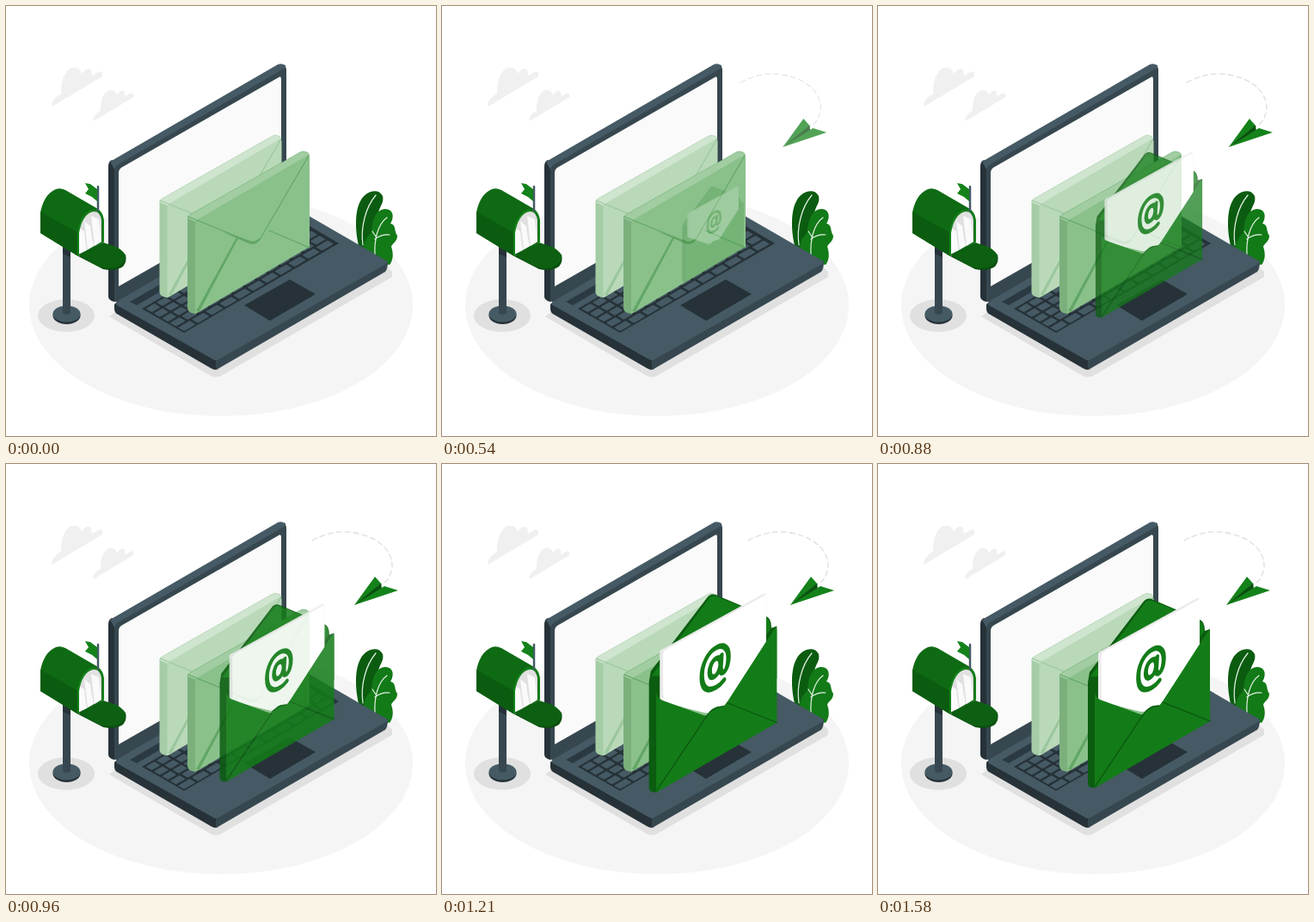
Recreate the animation shown at these times as an HTML page. Size 500 by 500 pixels, loop 1.62 s.

```html
<!DOCTYPE html>
<html lang="en">
<head>
<meta charset="utf-8">
<title>Incoming mail</title>
<style>
  html, body { margin: 0; width: 100%; height: 100%; overflow: hidden; background: #fff; }
  svg { display: block; width: 100%; height: 100%; }
  .line { fill: none; stroke-linecap: round; stroke-linejoin: round; }
</style>
</head>
<body>
<svg viewBox="0 0 500 500">
  <ellipse cx="250" cy="348" rx="223" ry="129" fill="#f5f5f5"/>

  <defs>
    <path id="cloud" d="M53 116Q53 108 64 102Q64 78 76 72Q86 70 88 79Q94 70 99 74L100 81L109 76Q113 76 112 82L57 115Q54 117 53 116Z"/>
  </defs>
  <g fill="#f0f0f0">
    <use href="#cloud"/>
    <use href="#cloud" transform="translate(58.6 40.4) scale(.8)"/>
  </g>

  <g id="plant">
    <path fill="#0b5c10" d="M411 282C406 264 405 240 412 227C418 215 433 211 438 221C440 229 434 233 433 241L427 262L424 287Z"/>
    <path fill="#127a17" d="M417 288C414 275 420 269 425 263C426 247 430 237 441 236C450 236 452 245 447 253C454 254 451 262 455 267C455 274 449 276 448 280C451 288 450 296 446 301L438 299Z"/>
    <g class="line" stroke="#e6f1e6" stroke-width="1.200">
      <path d="M415 278C412 258 418 234 430 220"/>
      <path d="M429 290C428 272 432 254 443 246M429 271Q437 265 446 266M430 268L426 262"/>
    </g>
  </g>

  <g id="laptop">
    <path fill="#e0e0e0" d="M120 361L238 430Q244 433 250 430L449 315V309L440 300L135 350Z"/>
    <path fill="#263238" d="M119 186Q119 181 123 179L131 184V341L126 344Q119 342 119 338Z"/>
    <path fill="#37474f" d="M126 184L322 70Q326 69 326 75V232L131 345L126 343Z"/>
    <path fill="#455a64" d="M121 181L316 68Q320 66 325 69Q326 71 323 73L129 185Q127 187 126 190Z"/>
    <path fill="#fafafa" d="M131 193Q131 190 134 188L317 83Q320 81 320 85V218L131 326Z"/>
    <path fill="#263238" d="M126 347L130 343L244 408V423Q241 423 238 421L129 358Q126 356 126 352Z"/>
    <path fill="#37474f" d="M244 408L444 296Q444 306 441 309L248 421Q246 423 244 423Z"/>
    <path fill="#455a64" d="M129 348Q126 346 130 343L326 229L442 296Q445 298 442 300L247 411Q244 413 241 411Z"/>
    <path fill="#2b3a42" d="M144 344L337 232L345 236L152 348Z"/>
    <path fill="#263238" d="M158 352L338 247L387 276L207 380Z"/>
    <g id="keys" fill="#455a64" transform="matrix(12.6 -7.35 9.4 5.5 160 352)"/>
    <path fill="#263238" d="M277 348L330 318L360 335L307 366Z"/>
  </g>

  <g id="mailbox">
    <ellipse cx="70" cy="360" rx="33" ry="19" fill="#e0e0e0"/>
    <ellipse cx="70.500" cy="360" rx="16" ry="10" fill="#263238"/>
    <ellipse cx="70.500" cy="358" rx="16" ry="9.500" fill="#455a64"/>
    <path fill="#37474f" d="M66 275H75V357Q70 361 66 357Z"/>
    <path fill="#263238" d="M66 278L75 283V292L66 288Z"/>
    <path fill="#0f6a14" d="M40 264V240Q44 219 58 213Q63 211 69 214L107 236Q113 240 113 249V275L84 291Z"/>
    <path fill="#0b5c10" d="M40 264V239L84 264V291Z"/>
    <path fill="#e0e0e0" d="M84 290V264Q87 245 98 240Q109 236 111 249V274Z"/>
    <path fill="#fafafa" d="M85 258L91 262Q92 274 94 284L85 289ZM91 250L98 256Q99 268 102 279L95 283ZM99 244L108 248L111 274L103 279Z"/>
    <path class="line" stroke="#14821a" stroke-width="2" d="M84 289V264Q87 244 99 238Q111 235 113 249V274"/>
    <path fill="#0b4f0f" d="M84 291L113 277L139 289Q141 297 136 303Q127 309 113 306Z"/>
    <path fill="#0d6012" d="M84 289L113 275L128 280Q140 286 139 294Q135 304 121 305Q113 305 106 302Z"/>
    <path class="line" stroke="#455a64" stroke-width="2.500" d="M107 210V238"/>
    <path fill="#14821a" d="M92 206L98 207L106 213V227L100 222L92 218L96 213Z"/>
  </g>

  <defs>
    <g id="closed">
      <path fill="var(--side)" d="M211 247L221 248V358Q211 357 211 351Z"/>
      <path fill="var(--top)" stroke="var(--fold)" stroke-width=".5" d="M211 247Q211 244 215 242L342 170Q345 168 350 170Q354 172 351 175L220 251Z"/>
      <path fill="var(--face)" d="M220 253Q220 250 223 248L350 174Q353 172 353 177V280L222 357Q220 358 220 356Z"/>
      <g class="line" stroke="var(--fold)">
        <path d="M353 281L306 261" stroke-width="1.300"/>
        <path d="M212 245L281 273Q290 280 296 270L352 174" stroke-width="1.200"/>
      </g>
      <path fill="var(--fold)" d="M221 355L268 269L270 270L225 355Z"/>
      <path fill="var(--fold)" d="M250 262L280 275Q290 281 297 269L290 273Q286 275 281 272Z"/>
    </g>
  </defs>
  <use href="#closed" transform="translate(-32.500 -18.700)" style="--side:#a5cda5;--top:#cfe5cf;--face:#b9d9b9;--fold:#9bc79d"/>
  <use href="#closed" style="--side:#7bb07c;--top:#a2cda2;--face:#8ac18b;--fold:#62a666"/>

  <g id="plane">
    <path class="line" stroke="#dedede" stroke-width="1.300" stroke-dasharray="6 4" d="M356 89C372 80 391 76 410 81C436 87 450 103 449 120Q447 133 440 138"/>
    <path fill="#14821a" d="M405 164L429 131L437 140Z"/>
    <path fill="#0b4f0f" d="M405 164L436 139L437 145L422 156Z"/>
    <path fill="#14821a" d="M405 164L440 142L456 147Z"/>
  </g>

  <g id="letter">
    <path fill="#0b5c10" d="M244 254L246 242L308 161Q312 155 318 157L374 181Q380 183 380 194L386 192V250L252 290Z"/>
    <path fill="#137c18" d="M247 247L310 162Q313 157 319 159L373 181Q379 184 379 195L340 250Z"/>
    <path fill="#ebebeb" d="M256 221Q256 218 260 217L371 156Q374 155 374 159V225L328 288H306L256 276Z"/>
    <path fill="#fff" d="M259.500 223Q260 220 263 218L374 157V225L328 288H306L260 276Z"/>
    <path class="line" stroke="#137c18" stroke-width="5.800" transform="matrix(.87 -.5 0 1 317.500 238.500)"
      d="M8 -10L7 4Q7 10 11 10C16 9 17 0 17 -4C17 -15 10 -22 1 -22C-10 -22 -17 -12 -17 1C-17 14 -10 22 1 22Q7 22 11 19M7 -1C6 5 3 9 -1 9C-5 9 -7 5 -7 1C-7 -5 -4 -10 1 -10C5 -10 7 -6 7 -1"/>
    <path fill="#0b5c10" d="M244 256Q244 252 248 250L254 268V376Q244 378 244 371Z"/>
    <path fill="#137c18" d="M252 264Q252 270 258 274L305 291Q310 292 313 286Q317 280 327 281L331 276L382 197Q386 190 386 197V299L255 375Q252 377 252 374Z"/>
    <path class="line" stroke="#0b5c10" stroke-width="1.500" d="M253 374L308 292Q314 282 327 281M386 299L331 277"/>
  </g>
</svg>

<script>
const LOOP = 1620;
const byId = id => document.getElementById(id);

const rows = [14, 14, 14, 13, 11];
rows.forEach((count, row) => {
  const width = 14 / count;
  for (let i = 0; i < count; i++) {
    const key = document.createElementNS("http://www.w3.org/2000/svg", "rect");
    const box = { x: i * width + 0.1, y: row + 0.12, width: width - 0.2, height: 0.76, rx: 0.1 };
    for (const name in box) key.setAttribute(name, box[name]);
    byId("keys").append(key);
  }
});

// cubic-bezier(.36, -.01, .5, 1.38)
const bezier = (s, a, b) => 3 * (1 - s) ** 2 * s * a + 3 * (1 - s) * s * s * b + s ** 3;
function ease(x) {
  if (x >= 1) return 1;
  let low = 0, high = 1;
  for (let i = 0; i < 24; i++) {
    const mid = (low + high) / 2;
    if (bezier(mid, 0.36, 0.5) < x) low = mid; else high = mid;
  }
  return bezier(low, -0.01, 1.38);
}

function show(part, progress, transform) {
  part.setAttribute("opacity", Math.min(1, Math.max(0, progress) ** 2));
  part.setAttribute("transform", transform);
}

function draw() {
  const time = performance.now() % LOOP;
  const slide = time < 80 ? 0 : ease(time / 960);
  const zoom = time < 80 ? 0 : ease(time / 1570);
  show(byId("plane"), slide, `translate(${60 * (slide - 1)} 0)`);
  show(byId("letter"), zoom, `translate(315 264) scale(${0.15 + 0.85 * zoom}) translate(-315 -264)`);
  requestAnimationFrame(draw);
}
draw();
</script>
</body>
</html>
```
